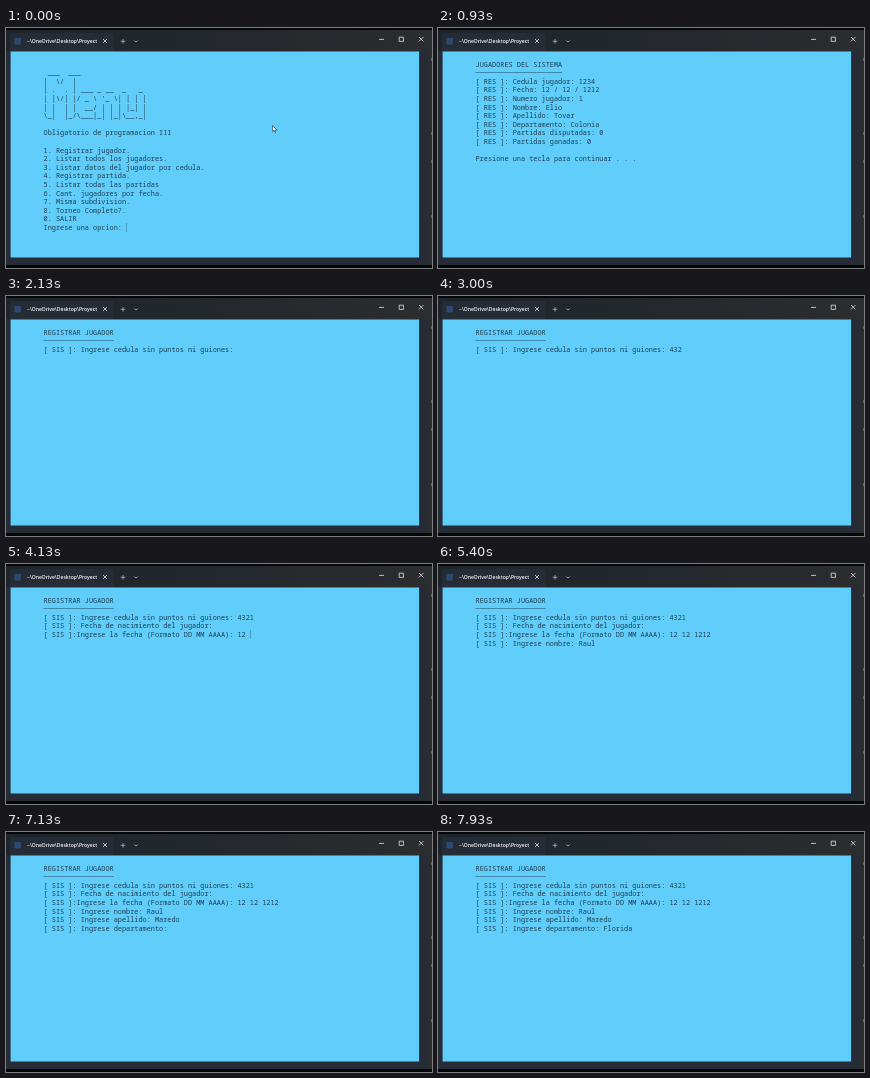
Write an HTML page that moves like this. It is 426 px wide and 240 px high and loops after 8 s.

```html
<!DOCTYPE html>
<html lang="es">
<head>
<meta charset="utf-8">
<title>Terminal</title>
<style>
  html, body { margin: 0; width: 100%; height: 100%; overflow: hidden; background: #050607; }
  svg, pre { position: absolute; }
  svg { left: 0; top: 0; }
  pre {
    left: 37.5px; top: 24px; margin: 0;
    font: 6.88px/8.6px "Noto Sans Mono", "DejaVu Sans Mono", monospace;
    font-variant-ligatures: none;
    color: #1f4052;
  }
  #caret { border-left: 1px solid #4c9fc4; margin-right: -1px; }
</style>
</head>
<body>
<svg width="426" height="240" viewBox="0 0 426 240">
  <linearGradient id="bar"><stop stop-color="#1d242b"/><stop offset="1" stop-color="#2b2d2f"/></linearGradient>
  <path fill="url(#bar)" d="M0 2H426V237H0Z"/>
  <path fill="#252c36" d="M4 23V8Q4 5 7 5H105Q108 5 108 8V23H422V237H0V23Z"/>
  <path fill="#60cdfb" d="M4.6 23.5H413.1V229.6H4.6Z"/>
  <path fill="#5a6268" d="M425 30h1v3h-1zM425 104h1v3h-1zM425 132h1v3h-1zM425 187h1v3h-1z"/>
  <path fill="#2c4a70" d="M8.5 10h6.5v6.5h-6.5z"/>
  <svg x="21" y="8" width="70" height="12">
    <text y="7" fill="#f2f4f6" font-family="Open Sans, Noto Sans, sans-serif" font-weight="600" font-size="5.05">~\OneDrive\Desktop\Proyecto</text>
  </svg>
  <g fill="none" stroke="#e4e7ea" stroke-width=".8">
    <path d="M97 11l4 4m0-4l-4 4M373 11.4h5M393.2 9.2h4.2v4.2h-4.2zM413 9l4.4 4.4m0-4.4l-4.4 4.4"/>
    <path stroke="#b4b9be" d="M117 11v4.6m-2.3-2.3h4.6M128.3 12.4l1.7 1.7 1.7-1.7"/>
  </g>
  <path id="mouse" fill="#fff" stroke="#17242d" stroke-width=".6" d="M266.6 97.5v6l1.4-1.2 1 2 .9-.4-.9-2h1.8z"/>
</svg>
<pre><span id="screen"></span><span id="caret"></span></pre>
<script>
const LOOP = 8000;
const $ = id => document.getElementById(id);

const menu = String.raw`

 ___  ___
|  \/  |
| .  . | ___ _ __  _   _
| |\/| |/ _ \ '_ \| | | |
| |  | |  __/ | | | |_| |
\_|  |_/\___|_| |_|\__,_|

Obligatorio de programacion III

1. Registrar jugador.
2. Listar todos los jugadores.
3. Listar datos del jugador por cedula.
4. Registrar partida.
5. Listar todas las partidas
6. Cant. jugadores por fecha.
7. Misma subdivision.
8. Torneo Completo?.
0. SALIR
Ingrese una opcion: `;

const heading = title => `\n${title}\n${'─'.repeat(title.length)}\n`;

const players = heading('JUGADORES DEL SISTEMA') + [
  'Cedula jugador: 1234', 'Fecha: 12 / 12 / 1212', 'Numero jugador: 1',
  'Nombre: Elio', 'Apellido: Tovar', 'Departamento: Colonia',
  'Partidas disputadas: 0', 'Partidas ganadas: 0'
].map(s => `[ RES ]: ${s}\n`).join('') + '\nPresione una tecla para continuar . . . ';

// [start, initial text]
const screens = [[0, menu], [530, players], [1200, menu], [1930, heading('REGISTRAR JUGADOR')]];

// [start, text, ms per key]; 0 prints the text at once
const output = [
  [330, '2', 0],
  [1800, '1', 0],
  [1930, '[ SIS ]: Ingrese cedula sin puntos ni guiones: ', 0],
  [2670, '4321', 130],
  [3270, '\n[ SIS ]: Fecha de nacimiento del jugador:\n[ SIS ]:Ingrese la fecha (Formato DD MM AAAA): ', 0],
  [3670, '12 ', 130],
  [4180, '12 1212', 48],
  [4530, '\n[ SIS ]: Ingrese nombre: ', 0],
  [5070, 'Raul', 80],
  [5600, '\n[ SIS ]: Ingrese apellido: ', 0],
  [5930, 'Maredo', 80],
  [6600, '\n[ SIS ]: Ingrese departamento: ', 0],
  [7190, 'Florida', 100]
];

function textAt(t) {
  const [start, base] = screens.filter(s => s[0] <= t).pop();
  return output.filter(o => o[0] >= start && o[0] <= t).reduce((text, [at, s, step]) =>
    text + (step ? s.slice(0, 1 + Math.floor((t - at) / step)) : s), base);
}

function draw(now) {
  const t = now % LOOP;
  const text = textAt(t);
  if ($('screen').textContent !== text) $('screen').textContent = text;
  $('caret').style.visibility = t % 1200 < 570 ? 'visible' : 'hidden';
  $('mouse').style.visibility = t < 330 ? 'visible' : 'hidden';
  requestAnimationFrame(draw);
}
draw(performance.now());
</script>
</body>
</html>
```
